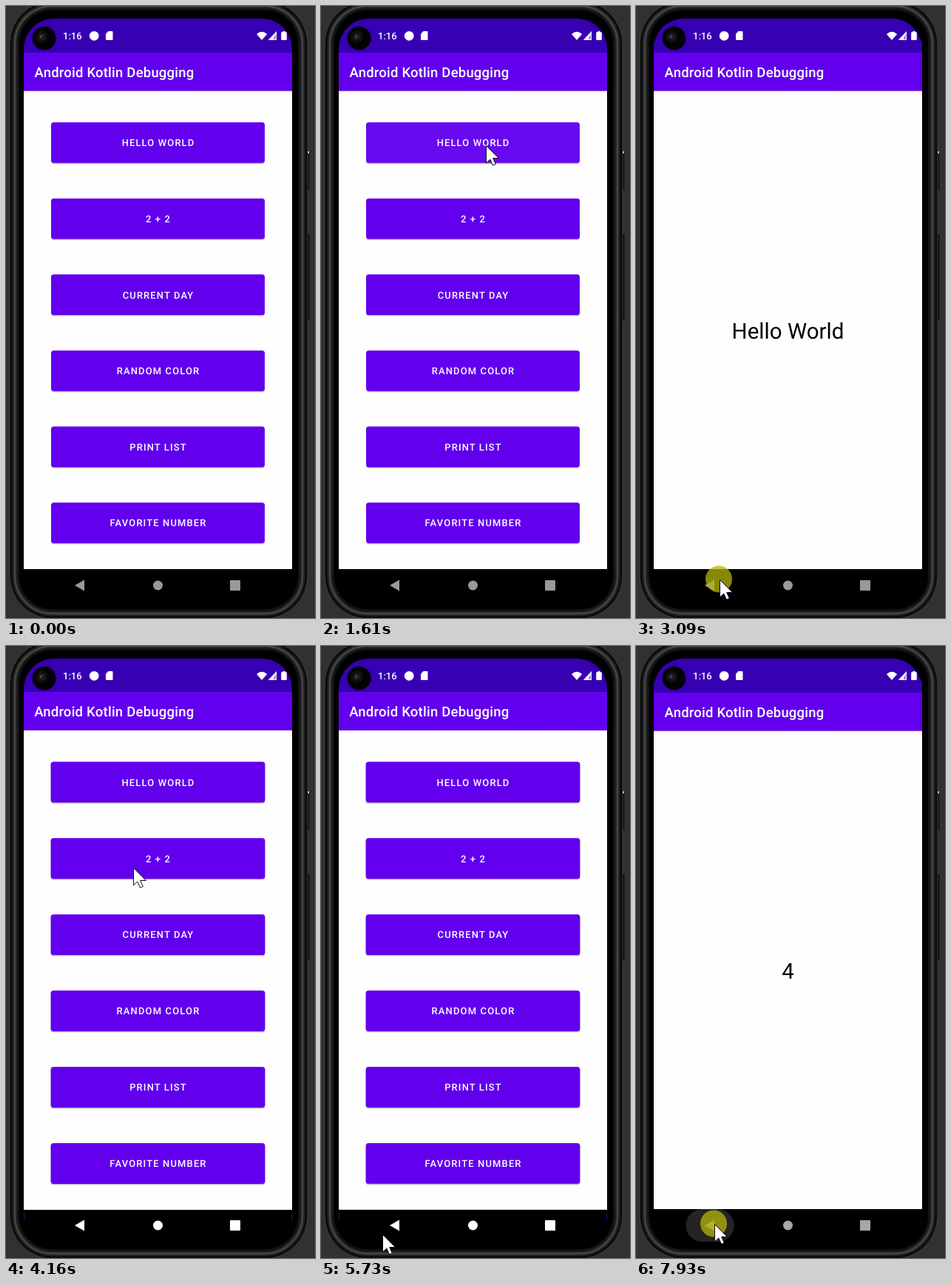
Animation of 418 by 826 pixels, one loop 7990 ms. Source, as an HTML page:

```html
<!DOCTYPE html>
<html lang="en">
<head>
<meta charset="utf-8">
<title>Android Kotlin Debugging</title>
<style>
  html, body { margin: 0; width: 100%; height: 100%; overflow: hidden; background: #303132; }
  svg { display: block; width: 100%; height: 100%; }
  text { font-family: Roboto, sans-serif; text-rendering: geometricPrecision; }
  .title { font-size: 18.47px; font-weight: 500; letter-spacing: .0125em; fill: #fff; }
  .label { font-size: 12.93px; font-weight: 500; letter-spacing: .0893em; fill: #fff; text-anchor: middle; }
  .result { font-size: 29.56px; fill: #000; text-anchor: middle; }
</style>
</head>
<body>
<svg viewBox="0 0 418 826">
  <defs>
    <clipPath id="screen">
      <path d="M24 58A41 41 0 0 1 65 17H346A41 41 0 0 1 387 58V775A31 31 0 0 1 356 806H55A31 31 0 0 1 24 775Z"/>
    </clipPath>
    <clipPath id="buttonClip"><rect id="clipRect" x="61" width="289" height="54.8" rx="3.7"/></clipPath>
    <linearGradient id="shade" x2="0" y2="1">
      <stop stop-color="#000" stop-opacity=".14"/><stop offset="1" stop-color="#000" stop-opacity="0"/>
    </linearGradient>
    <g id="page">
      <rect x="24" y="17" width="363" height="789" fill="#000"/>
      <rect x="24" y="63" width="363" height="697" fill="#fefefe"/>
      <rect x="24" y="17" width="363" height="46.5" fill="#3700b3"/>
      <rect x="24" y="114" width="363" height="2.2" fill="url(#shade)"/>
      <rect x="24" y="63" width="363" height="51.6" fill="#6200ee"/>
      <text class="title" x="38.6" y="96">Android Kotlin Debugging</text>
    </g>
  </defs>

  <!-- phone body -->
  <rect width="418" height="826" fill="#303132"/>
  <rect x="407" y="196" width="3.5" height="53" rx="1" fill="#151515"/>
  <rect x="408" y="196" width="2" height="3" fill="#ddd"/>
  <rect x="407" y="308" width="3.5" height="116" rx="1" fill="#0c0c0c"/>
  <g fill="none">
    <rect x="5" y="-7" width="403" height="834" rx="58" fill="#0b0b0b" stroke="#3e3e3e"/>
    <rect x="12" y="0" width="389" height="820" rx="51" stroke="#222" stroke-width="7"/>
    <rect x="12" y="0" width="389" height="820" rx="51" stroke="#454545" stroke-width="2.4"/>
    <rect x="17" y="5" width="379" height="810" rx="46" fill="#000" stroke="#1c1c1c"/>
  </g>

  <g clip-path="url(#screen)">
    <g id="main"><use href="#page"/><g id="buttons"></g>
      <circle id="ripple" fill="#fff" clip-path="url(#buttonClip)"/>
    </g>
    <rect id="scrim" x="24" y="17" width="363" height="789"/>
    <g id="detail"><use href="#page"/><text id="result" class="result" x="205.5" y="449"></text></g>
  </g>
  <path id="edges" d="M24.5 765V775M386.5 765V775" stroke="#2b0a86"/>

  <!-- camera and status icons -->
  <circle cx="51.5" cy="43.5" r="16" fill="#020202"/>
  <circle cx="48.5" cy="41.5" r="8.5" fill="#0e0e0e"/>
  <circle cx="48.5" cy="41.5" r="5" fill="#1e1e1e"/>
  <circle cx="48" cy="41.5" r="1.8" fill="#666"/>
  <circle cx="48.8" cy="42" r="1.2" fill="#1a1a1a"/>
  <g fill="#fff">
    <text x="77" y="45" font-size="13" font-weight="500">1:16</text>
    <circle cx="119.2" cy="40.3" r="6.4"/>
    <path d="M138.5 34H143.5Q144.5 34 144.5 35V45Q144.5 46 143.5 46H136Q135 46 135 45V37.5Z"/>
    <path d="M339 38Q346 31.5 353.2 38L346 46Z"/>
    <path d="M354.8 46L366 34V46Z" fill-opacity=".4"/>
    <path d="M354.8 46L366 34V46ZM362 44.8H364.8V37Z" fill-rule="evenodd"/>
    <path d="M374.5 34H377.5V35.3H379Q379.8 35.3 379.8 36.2V45Q379.8 46 379 46H373Q372.2 46 372.2 45V36.2Q372.2 35.3 373 35.3H374.5Z"/>
  </g>

  <rect id="pill" y="760" height="44" rx="22" fill="#fff"/>
  <g id="nav">
    <path d="M93 782L106 774.5V789.5Z"/>
    <circle cx="205.5" cy="782" r="6.5"/>
    <rect x="303" y="775" width="14" height="14" rx="1"/>
  </g>
  <circle id="tap" r="18" fill="#b6b60a" fill-opacity=".75"/>
  <path id="cursor" d="M0 0V23.4L5.3 18.5L9 26.7L12.8 25L9.2 17H17Z" fill="#fff" stroke="#0b0620" stroke-linejoin="round"/>
</svg>
<script>
const LOOP = 7990;
const el = id => document.getElementById(id);
const clamp = v => Math.max(0, Math.min(1, v));
const span = (t, a, b) => clamp((t - a) / (b - a));
const smooth = x => x * x * (3 - 2 * x);
const easeOut = x => 1 - (1 - x) ** 3;
const within = (t, [a, b]) => t >= a && t < b;
const set = (id, attrs) => { for (const k in attrs) el(id).setAttribute(k, attrs[k]); };

const buttonTop = i => 157 + 102.65 * i;
const labels = ['HELLO WORLD', '2 + 2', 'CURRENT DAY', 'RANDOM COLOR', 'PRINT LIST', 'FAVORITE NUMBER'];
el('buttons').innerHTML = labels.map((label, i) => {
  const y = buttonTop(i);
  const box = (dy, fill) => `<rect x="61" y="${y + dy}" width="289" height="54.8" rx="3.7" ${fill}/>`;
  return box(1.8, 'fill-opacity=".12"') + box(.9, 'fill-opacity=".2"') + box(0, 'fill="#6200ee"') +
    `<text class="label" x="206" y="${y + 32.2}">${label}</text>`;
}).join('');

// time, x, y of the pointer tip
const path = [
  [250, 324, 485], [730, 223, 188], [2150, 223, 188], [2600, 125, 748], [2810, 113, 774],
  [3680, 113, 774], [4130, 172, 299], [4760, 172, 299], [5330, 54, 799], [5450, 54, 799],
  [5730, 83, 794], [5790, 83, 794], [6110, 167, 302], [6790, 167, 302], [7530, 106, 780], [LOOP, 106, 780]
];
const taps = [[930, 1140], [3090, 3300], [4640, 4760], [6110, 6260], [7800, LOOP]];
const presses = [{ at: 1140, end: 1850, row: 0 }, { at: 4690, end: 5250, row: 1 }, { at: 6140, end: 6300, row: 1 }];
const stalls = [[6400, 6590], [6590, 6790]];
const CLOSE = 3640, REOPEN = 6260, RUN = 630;

function pointer(t) {
  let i = 1;
  while (i < path.length - 1 && path[i][0] <= t) i++;
  const [a, b] = [path[i - 1], path[i]];
  const k = smooth(span(t, a[0], b[0]));
  return [a[1] + (b[1] - a[1]) * k, a[2] + (b[2] - a[2]) * k];
}

function scale(id, s, alpha) {
  set(id, { transform: `translate(205.5 411) scale(${s}) translate(-205.5 -411)`, opacity: alpha });
}

function drawPages(t) {
  const closing = t >= CLOSE && t < REOPEN;
  const start = closing ? CLOSE : t >= REOPEN ? REOPEN : 1810;
  const p = easeOut(span(t, start, start + RUN));
  const rest = t >= CLOSE ? 1.0025 : 1;
  scale('main', rest + (1.05 - rest) * (closing ? 1 - p : p), 1);
  if (closing) scale('detail', 1 - .1 * p, 1 - span(t, CLOSE + 30, CLOSE + 170));
  else scale('detail', .85 + .15 * p, span(t, start, start + 110));
  set('scrim', { opacity: closing ? 0 : .26 * span(t, start, start + 150) });
  set('edges', { opacity: +within(t, [4100, REOPEN]) });
  el('result').textContent = t < 5000 ? 'Hello World' : '4';
}

function drawRipple(t, x, y) {
  const press = presses.find(p => within(t, [p.at, p.end]));
  if (!press) return set('ripple', { opacity: 0 });
  const age = t - press.at;
  set('clipRect', { y: buttonTop(press.row) });
  set('ripple', {
    cx: x, cy: y, r: 20 + 230 * easeOut(clamp(age / 260)),
    opacity: .15 - .11 * span(age, 220, 460)
  });
}

function drawNav(t) {
  const lit = span(t, 3160, 3490) - span(t, 6790, 7100) + .2 * span(t, 7800, LOOP);
  const g = Math.round(153 + 102 * lit);
  set('nav', { fill: `rgb(${g},${g},${g})` });
  const age = t - (t > 7000 ? 7850 : 3150);
  const half = Math.min(46.5, 22 + Math.max(0, age) / 7.6);
  set('pill', {
    x: 100 - half, width: half * 2,
    opacity: age < 0 ? 0 : .14 * (1 - span(t, 3560, 3780) * (t < 7000))
  });
}

function render(time) {
  const stall = stalls.find(s => within(time, s));
  const t = stall ? stall[0] : time;
  const [x, y] = pointer(t);
  drawPages(t);
  drawRipple(t, x, y);
  drawNav(t);
  set('cursor', { transform: `translate(${x + .5} ${y + .5})`, opacity: +(t >= 250) });
  set('tap', { cx: x - 1, cy: y - .5, opacity: +taps.some(r => within(t, r)) });
}

const begin = performance.now();
function tick() {
  render((performance.now() - begin) % LOOP);
  requestAnimationFrame(tick);
}
tick();
</script>
</body>
</html>
```
